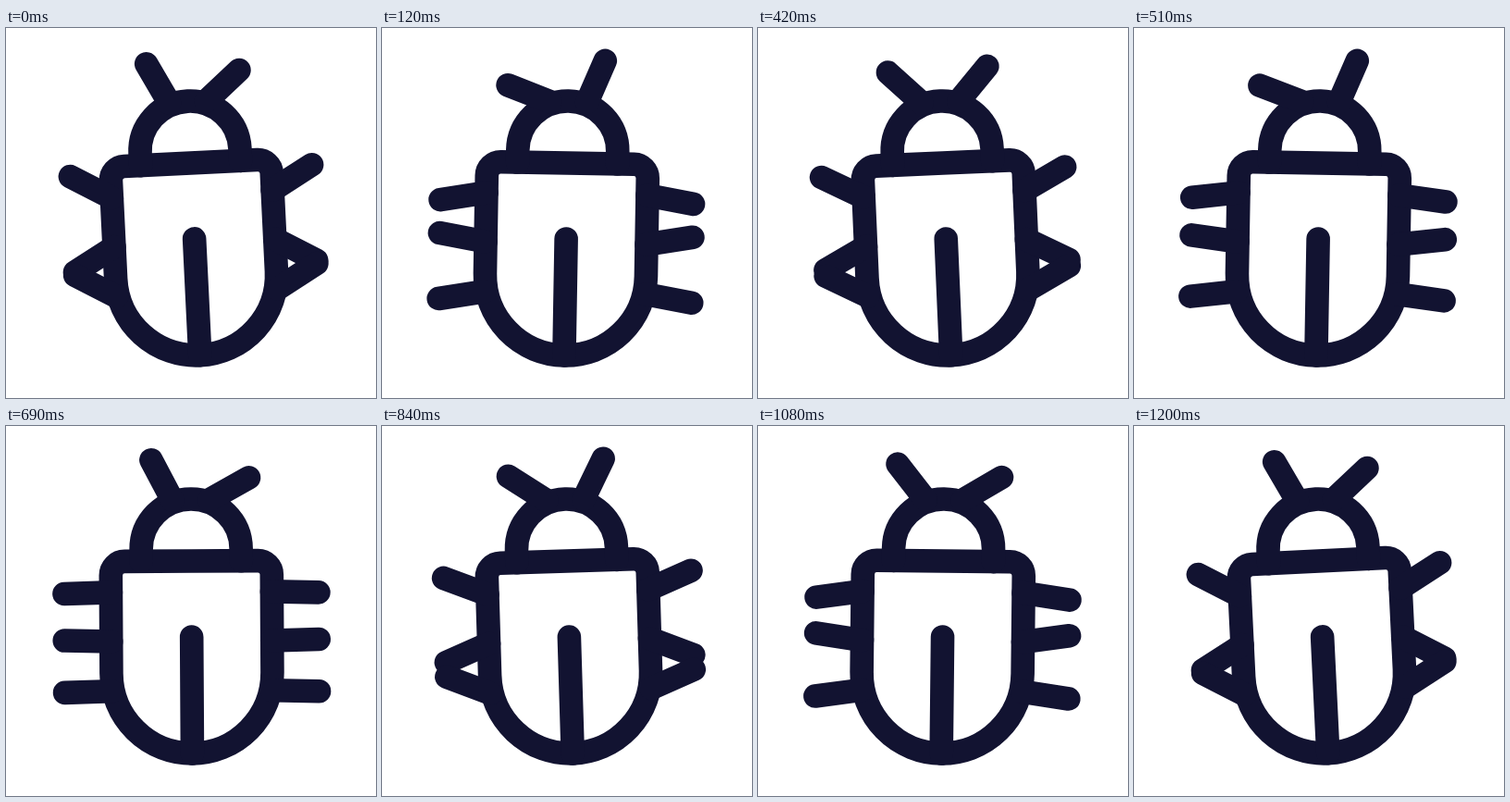
An HTML page with a canvas for the animation above (1230 ms loop, 400 by 400 pixels).

```html
<!DOCTYPE html>
<html lang="en">
<head>
<meta charset="utf-8">
<title>Wiggling bug</title>
<style>
  html, body { margin: 0; width: 100%; height: 100%; overflow: hidden; background: #fff; }
  canvas { display: block; width: 100vw; height: 100vh; object-fit: contain; }
</style>
</head>
<body>
<canvas id="stage" width="400" height="400"></canvas>
<script>
const ctx = document.getElementById('stage').getContext('2d');
const LOOP = 1230, STEP = 30;
const CENTER = 200.3, PIVOT_Y = 160;
const rad = deg => deg * Math.PI / 180;

// Step positions of successive extremes; each swing eases between them.
const BODY_KEYS = [0, 6.5, 13, 19.5, 26, 33, 40];
const LEG_KEYS = [0, 6.6, 13.2, 19.8, 26.4, 33.2, 40];
const LEFT_KEYS = [-0.8, 4.5, 11, 17.4, 24, 30.5, 39.2, 44.5];
const RIGHT_KEYS = [-2.6, 4.2, 10.7, 17.2, 23.7, 29.3, 37.4, 44.2];

function swing(step, keys, from, to) {
  let i = 0;
  while (i < keys.length - 2 && step >= keys[i + 1]) i++;
  const part = (step - keys[i]) / (keys[i + 1] - keys[i]);
  const eased = (1 - Math.cos(Math.PI * part)) / 2;
  return from + (to - from) * (i % 2 ? 1 - eased : eased);
}

function limb(x, y, length, deg) {
  ctx.beginPath();
  ctx.moveTo(x, y);
  ctx.lineTo(x + length * Math.cos(rad(deg)), y + length * Math.sin(rad(deg)));
  ctx.stroke();
}

function drawShell() {
  const half = 87, top = 146, curve = 267, corner = 15;
  ctx.beginPath();
  ctx.moveTo(0, top);
  ctx.arcTo(half, top, half, curve, corner);
  ctx.lineTo(half, curve);
  ctx.arc(0, curve, half, 0, Math.PI);
  ctx.arcTo(-half, top, 0, top, corner);
  ctx.closePath();
  ctx.stroke();
  limb(0, 228, 126, 90);
}

function drawHead() {
  ctx.beginPath();
  ctx.moveTo(-54, 146);
  ctx.arc(0, 133, 54, Math.PI, 0);
  ctx.lineTo(54, 146);
  ctx.stroke();
}

function draw(step) {
  ctx.fillStyle = '#fff';
  ctx.fillRect(0, 0, 400, 400);
  ctx.save();
  ctx.strokeStyle = '#121331';
  ctx.lineWidth = 25.6;
  ctx.lineCap = 'round';
  ctx.translate(CENTER, PIVOT_Y);
  ctx.rotate(rad(swing(step, BODY_KEYS, -2.8, 2.8)));
  ctx.translate(0, -PIVOT_Y);

  drawShell();
  drawHead();
  limb(-20, 80, 49, swing(step, LEFT_KEYS, -25, -70.5) - 90);
  limb(20, 80, 49, swing(step, RIGHT_KEYS, 62, 22.5) - 90);

  const bend = swing(step, LEG_KEYS, -30, 30);
  [[179.4, 1], [232.5, -1], [286.3, 1]].forEach(([y, sign]) => {
    limb(-87, y, 50.5, 180 - sign * bend);
    limb(87, y, 50.5, sign * bend);
  });
  ctx.restore();
}

function tick() {
  draw(Math.floor(performance.now() % LOOP / STEP));
  requestAnimationFrame(tick);
}
tick();
</script>
</body>
</html>
```
